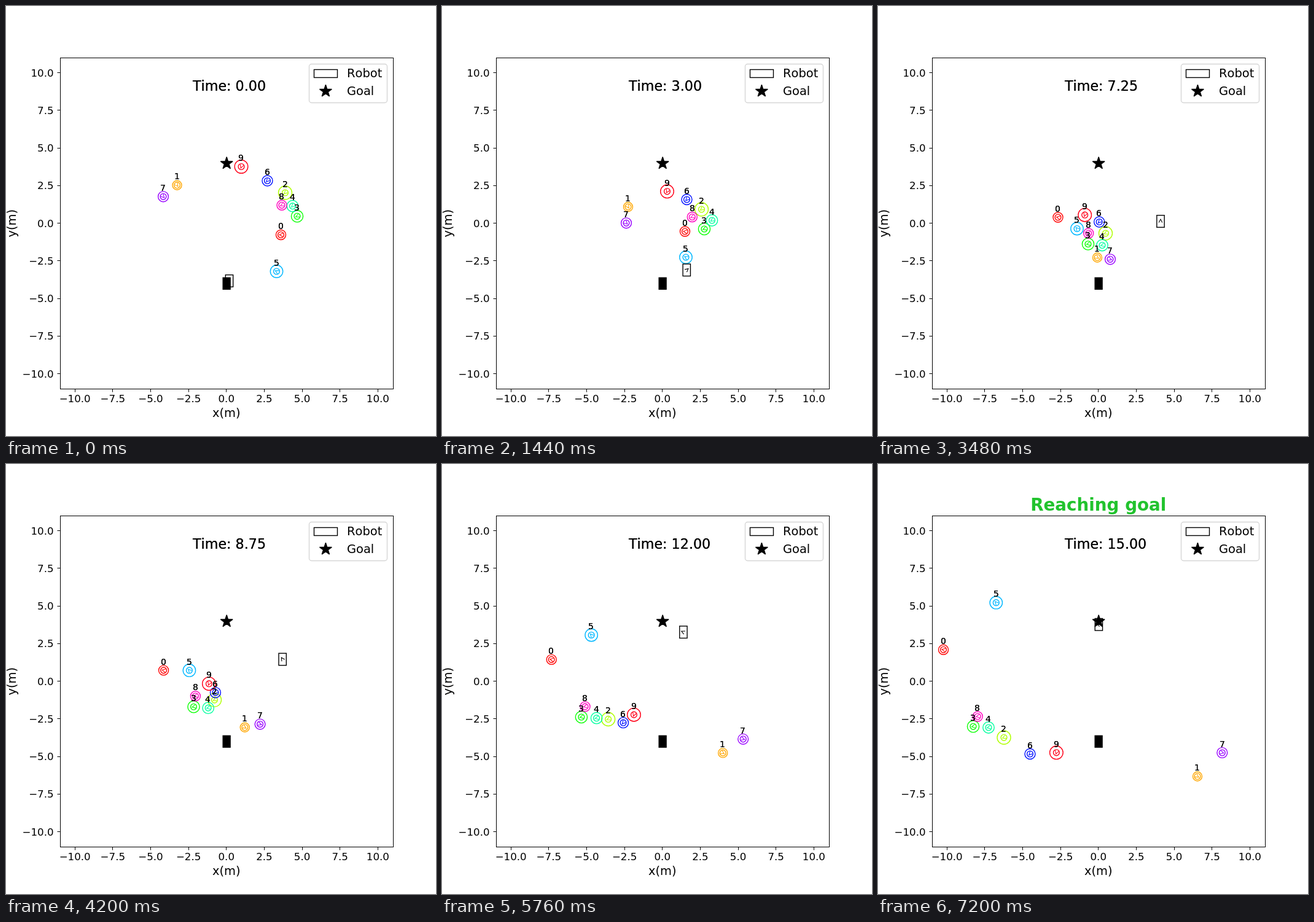
Animation, 700 px wide and 700 px high, one loop 7320 ms. Source, as an HTML page with a canvas:

```html
<!DOCTYPE html>
<html lang="en">
<head>
<meta charset="utf-8">
<title>Robot crowd navigation</title>
<style>
  html, body { margin: 0; width: 100%; height: 100%; overflow: hidden; background: #fff; }
  canvas { display: block; }
</style>
</head>
<body>
<canvas id="stage" width="700" height="700"></canvas>
<script>
const ctx = document.getElementById('stage').getContext('2d');
const STEP_MS = 120, LAST = 60;
const LINE = 1.39;
const CRUISE = 6.1;                 // free walking speed, pixels per step
const TIMES = [0, 12, 29, LAST];    // start, in the crowd, leaving it, end

const agent = (r, ...points) => ({ r, points });
const agents = [
  agent(8, [447.5, 372.5], [395.5, 367], [293, 344], [106.5, 302.3]),
  agent(7.5, [278.5, 291.7], [303, 327], [357, 409.5], [520, 508.5]),
  agent(11, [454.5, 304], [422.5, 331], [370.5, 370], [205, 445.3]),
  agent(9.6, [474, 342.3], [427, 363], [342, 387.5], [155, 427.3]),
  agent(9.2, [466.5, 325.7], [439.5, 349], [365, 389.5], [180, 429]),
  agent(10.2, [440.5, 432], [397, 409], [324, 362.5], [192.3, 225.7]),
  agent(8.5, [425.5, 284.5], [398.5, 315], [360.2, 351.5], [247.5, 472]),
  agent(8.4, [256, 310.3], [300, 353.3], [378, 412.3], [560.3, 470]),
  agent(8, [449, 324.3], [407.3, 343.5], [342.7, 370], [162.2, 411]),
  agent(10.8, [383, 261.5], [366.5, 301.8], [336.7, 340.2], [290.4, 469.8])
];
const robot = { points: [[363.5, 447.5], [398.3, 429.8], [460, 350.5], [359.4, 261.3]] };

const secant = (p, i, axis) => (p[i + 1][axis] - p[i][axis]) / (TIMES[i + 1] - TIMES[i]);

// Velocities at the path points: from rest, through the crowd, then the last leg
function setVelocities(mover, leave, end) {
  const p = mover.points, a = TIMES[1] - TIMES[0], b = TIMES[2] - TIMES[1];
  const crowd = [0, 1].map(k => (secant(p, 0, k) * b + secant(p, 1, k) * a) / (a + b));
  mover.velocities = [[0, 0], crowd, leave, end];
}

// Agents accelerate evenly to cruising speed on the last leg
for (const a of agents) {
  const mean = [secant(a.points, 2, 0), secant(a.points, 2, 1)];
  const end = mean.map(v => v * CRUISE / Math.hypot(...mean));
  setVelocities(a, mean.map((v, k) => 2 * v - end[k]), end);
}
// The robot rounds the crowd heading straight up and stops at the goal
setVelocities(robot, [0, -CRUISE], [0, 0]);

// Cubic Hermite curve through the points
function position({ points, velocities }, s) {
  const i = s < TIMES[1] ? 0 : s < TIMES[2] ? 1 : 2;
  const h = TIMES[i + 1] - TIMES[i], u = (s - TIMES[i]) / h, v = 1 - u;
  return [0, 1].map(k =>
    points[i][k] * v * v * (1 + 2 * u) + points[i + 1][k] * u * u * (3 - 2 * u)
    + h * u * v * (velocities[i][k] * v - velocities[i + 1][k] * u));
}

function heading(mover, s) {
  const [ax, ay] = position(mover, Math.max(s - 0.5, 0));
  const [bx, by] = position(mover, Math.min(s + 0.5, LAST));
  return Math.atan2(by - ay, bx - ax);
}

function text(str, x, y, size, align = 'center', weight = '') {
  ctx.font = `${weight} ${size}px "DejaVu Sans", sans-serif`;
  ctx.fontKerning = 'none';
  ctx.textAlign = align;
  ctx.fillText(str, x, y);
}

function line(...points) {
  ctx.beginPath();
  for (const [x, y] of points) ctx.lineTo(x, y);
  ctx.stroke();
}

function circle(x, y, r) {
  ctx.beginPath();
  ctx.arc(x, y, r, 0, 2 * Math.PI);
  ctx.stroke();
}

function star(x, y) {
  ctx.beginPath();
  for (let i = 0; i < 10; i++) {
    const r = i % 2 ? 4 : 10.4, a = i * Math.PI / 5;
    ctx.lineTo(x + r * Math.sin(a), y - r * Math.cos(a));
  }
  ctx.closePath();
  ctx.fill();
  ctx.lineJoin = 'bevel';
  ctx.stroke();
  ctx.lineJoin = 'miter';
}

function arrowhead(x, y, angle, reach) {
  ctx.save();
  ctx.translate(x, y);
  ctx.rotate(angle);
  ctx.lineWidth = 1.1;
  line([reach - 5.5, -2.8], [reach, 0], [reach - 5.5, 2.8]);
  ctx.restore();
}

function drawAxes() {
  ctx.lineWidth = 1;
  ctx.strokeRect(88.5, 84.5, 542, 539);
  for (let v = -10; v <= 10; v += 2.5) {
    const label = v.toFixed(1).replace('-', '\u2212');
    const x = 358.75 + 24.66 * v, y = 353.5 - 24.5 * v;
    const px = Math.floor(x) + 0.5, py = Math.floor(y) + 0.5;
    line([px, 624], [px, 628.5]);
    line([83.5, py], [88, py]);
    text(label, x, 645, 16.67);
    text(label, 77.6, Math.round(y + 6), 16.67, 'right');
  }
  text('x(m)', 358.8, 669, 19.44);
  ctx.save();
  ctx.translate(16, 353.7);
  ctx.rotate(-Math.PI / 2);
  text('y(m)', 0, 0, 19.44);
  ctx.restore();
}

function drawLegend() {
  ctx.lineWidth = LINE;
  ctx.strokeStyle = '#d6d6d6';
  ctx.beginPath();
  ctx.roundRect(493.5, 94.5, 127, 63, 4);
  ctx.stroke();
  ctx.strokeStyle = '#000';
  ctx.strokeRect(501.5, 103.5, 38, 13);
  star(520.4, 138.6);
  text('Robot', 555, 116, 19.44, 'left');
  text('Goal', 555, 145, 19.44, 'left');
}

function drawAgent(a, i, step) {
  const [x, y] = position(a, step);
  ctx.strokeStyle = `hsl(${i * 39.38}, 100%, 50%)`;
  circle(x, y, a.r);
  circle(x, y, 4.9);
  arrowhead(x, y, heading(a, step), 2.5);
  ctx.strokeStyle = '#000';
}

function drawRobot(step) {
  const [x, y] = position(robot, step);
  ctx.strokeRect(x - 6.15, y - 9.8, 12.3, 19.6);
  if (step > 0) arrowhead(x, y, heading(robot, step), 3.4);
}

function draw(step) {
  ctx.fillStyle = '#fff';
  ctx.fillRect(0, 0, 700, 700);
  ctx.fillStyle = ctx.strokeStyle = '#000';
  drawAxes();
  drawLegend();

  agents.forEach((a, i) => drawAgent(a, i, step));
  drawRobot(step);
  ctx.fillRect(352.5, 441.6, 13.3, 20.3);
  star(359.2, 256.2);

  // Labels are painted twice for a slightly heavier edge
  for (let pass = 0; pass < 2; pass++) {
    agents.forEach((a, i) => {
      const [x, y] = position(a, step);
      text(i, Math.round(x - 4.8), Math.round(y - 9.3), 13.89, 'left');
    });
    text(`Time: ${(step / 4).toFixed(2)}`, 304, 138, 22.22, 'left');
  }

  if (step === LAST) {
    ctx.fillStyle = '#22c32e';
    text('Reaching goal', 358.75, 76, 27.78, 'center', 'bold');
  }
}

const start = performance.now();
let shown = -1;
function tick() {
  const step = Math.floor((performance.now() - start) / STEP_MS) % (LAST + 1);
  if (step !== shown) draw(shown = step);
  requestAnimationFrame(tick);
}
tick();
</script>
</body>
</html>
```
